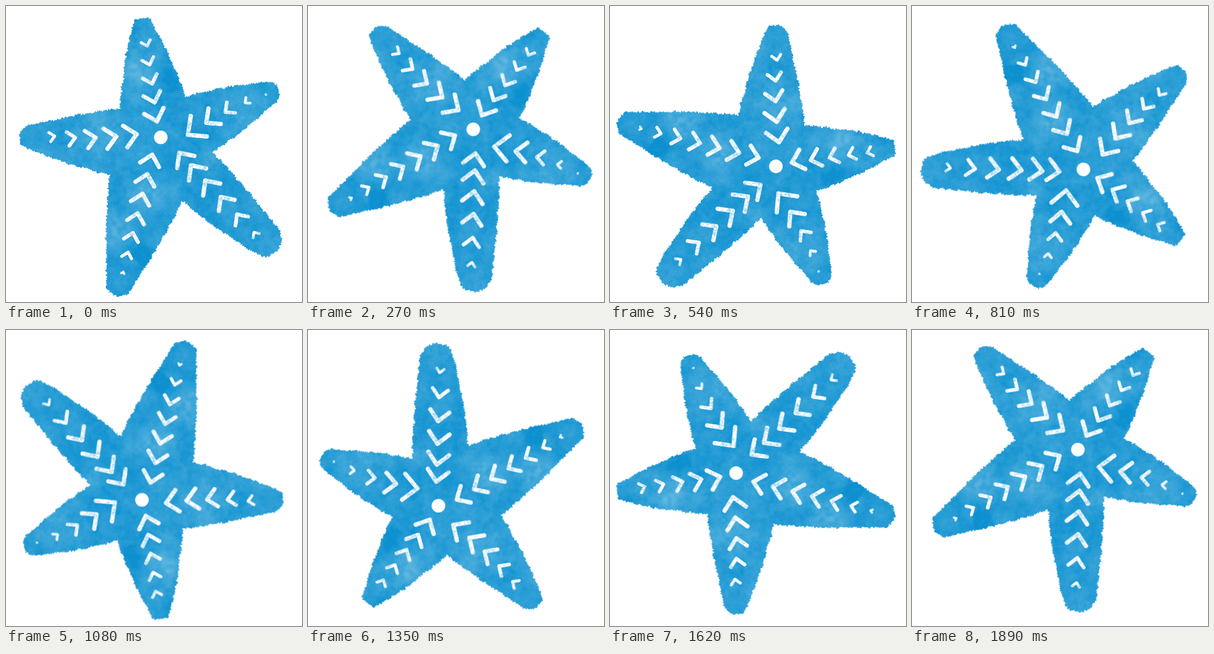
Write an HTML page with a canvas that moves like this. It is 480x480 px and loops after 2.16 s.

```html
<!DOCTYPE html>
<html lang="en">
<head>
<meta charset="utf-8">
<title>Starfish</title>
<style>
html, body { margin: 0; width: 100%; height: 100%; overflow: hidden; background: #fff; }
canvas { display: block; width: 480px; height: 480px; }
</style>
</head>
<body>
<canvas id="stage" width="480" height="480"></canvas>
<script>
const SIZE = 480, STEP = 270;
const HUB = { x: 251, y: 213 };

// eighths of a turn, then the place of the hub
const POSES = [
  [0, 251, 213], [1, 268, 200], [2, 269, 260], [3, 278, 265],
  [4, 220.5, 275.5], [5, 211.5, 285], [6, 204.5, 232], [1, 269, 194]
];

// tip: centre and radius of the rounded end; notch: the corner after the arm, clockwise.
// Marks run between two points and shrink from near to far.
const ARMS = [
  { tip: [222, 38, 19], notch: [292, 147],
    from: [245, 187], to: [229, 65], count: 5, near: 24, far: 11, fade: 1, tilt: -10 },
  { tip: [424, 142, 20], notch: [335, 237],
    from: [295, 209], to: [421, 144], count: 5, near: 31, far: 1, fade: 1, tilt: -11, bend: -5 },
  { tip: [419, 378, 28], notch: [286, 317],
    from: [281, 238], to: [402, 367], count: 6, near: 25, far: 9, fade: 4, tilt: 8, ease: 1.15 },
  { tip: [184, 449, 22], notch: [168, 274],
    from: [237, 241], to: [190, 431], count: 7, near: 23, far: 4, fade: 3, tilt: 0 },
  { tip: [43, 213, 21], notch: [184, 167],
    from: [212, 208], to: [79, 211], count: 5, near: 26, far: 11, fade: 1.6, tilt: -10, bend: -4 }
];

// x, y, radius, lightness
const WASHES = [
  [212, 110, 26, .42], [172, 360, 28, .35], [227, 305, 32, .25], [135, 215, 48, .18],
  [345, 170, 36, .15], [262, 118, 24, -.2], [220, 408, 26, -.28], [300, 200, 48, -.12]
];

const hash = (x, y) => {
  let h = Math.imul(x, 374761393) + Math.imul(y, 668265263) | 0;
  h = Math.imul(h ^ h >>> 13, 1274126177);
  return ((h ^ h >>> 16) >>> 0) / 4294967296;
};
const mix = (a, b, t) => a + (b - a) * t;
const clamp = (v, lo, hi) => Math.min(hi, Math.max(lo, v));

function noise(x, y) {
  const i = Math.floor(x), j = Math.floor(y);
  let u = x - i, v = y - j;
  u *= u * (3 - 2 * u);
  v *= v * (3 - 2 * v);
  return mix(mix(hash(i, j), hash(i + 1, j), u), mix(hash(i, j + 1), hash(i + 1, j + 1), u), v);
}

function cloud(x, y) {
  return .36 * noise(x / 30, y / 30) + .26 * noise(x / 13 + 9, y / 13)
    + .22 * noise(x / 6, y / 6 + 5) + .16 * noise(x / 2.5, y / 2.5);
}

// Draws shapes on their own layer, then recolours each painted pixel.
function layer(draw, shade) {
  const c = document.createElement('canvas');
  c.width = c.height = SIZE;
  const g = c.getContext('2d');
  draw(g);
  const img = g.getImageData(0, 0, SIZE, SIZE), d = img.data;
  for (let i = 0; i < d.length; i += 4) {
    if (d[i + 3]) shade(d, i, i / 4 % SIZE, Math.floor(i / 4 / SIZE));
  }
  g.putImageData(img, 0, 0);
  return c;
}

// A line with frayed edges and a slight outward bulge.
function frayed(g, [ax, ay], [bx, by], bulge) {
  const dx = bx - ax, dy = by - ay, len = Math.hypot(dx, dy);
  for (let s = 0; s < len; s += 1.2) {
    const t = s / len, x = mix(ax, bx, t), y = mix(ay, by, t);
    const seed = Math.round(x * 31 + y * 17);
    const off = bulge * 4 * t * (1 - t) + (hash(seed, 7) - .5) * 3.4
      + (noise(x / 6, y / 6) - .5) * 3;
    g.lineTo(x + dy / len * off, y - dx / len * off);
  }
}

function body(g) {
  g.beginPath();
  ARMS.forEach(({ tip: [x, y, r], notch }, k) => {
    const prev = ARMS[(k + ARMS.length - 1) % ARMS.length].notch;
    const aim = Math.atan2(y - (prev[1] + notch[1]) / 2, x - (prev[0] + notch[0]) / 2);
    const rim = a => [x + r * Math.cos(aim + a), y + r * Math.sin(aim + a)];
    const turn = Math.PI / 12;
    frayed(g, prev, rim(-6 * turn), 2.5);
    for (let i = -6; i < 6; i++) frayed(g, rim(i * turn), rim((i + 1) * turn), 0);
    frayed(g, rim(6 * turn), notch, 2.5);
  });
  g.closePath();
  g.fill();
}

function paint(d, i, x, y) {
  let v = .25 + (cloud(x, y) - .5) * .7;
  for (const [px, py, r, k] of WASHES) {
    const q = ((x - px) ** 2 + (y - py) ** 2) / (r * r);
    v += k * Math.exp(-q) * (.4 + 1.1 * noise(x / 8, y / 8));
  }
  v = clamp(v, 0, .85);
  d[i] = mix(12, 125, v);
  d[i + 1] = mix(144, 196, v);
  d[i + 2] = mix(208, 229, v);
}

function chalk(g) {
  g.strokeStyle = g.fillStyle = '#fff';
  g.lineCap = g.lineJoin = 'round';
  for (const { from, to, count, near, far, fade, tilt, bend = 0, ease = 1 } of ARMS) {
    const aim = Math.atan2(to[1] - from[1], to[0] - from[0]);
    for (let k = 0; k < count; k++) {
      const t = k / (count - 1), along = t ** ease, side = bend * 4 * t * (1 - t);
      const x = mix(from[0], to[0], along) - Math.sin(aim) * side;
      const y = mix(from[1], to[1], along) + Math.cos(aim) * side;
      const leg = mix(near, far, t ** fade), mid = aim + tilt * Math.PI / 180;
      g.lineWidth = Math.min(3 + leg * .17, 7);
      g.beginPath();
      g.moveTo(x + leg * Math.cos(mid - .75), y + leg * Math.sin(mid - .75));
      g.lineTo(x, y);
      g.lineTo(x + leg * Math.cos(mid + .75), y + leg * Math.sin(mid + .75));
      g.stroke();
    }
  }
  g.beginPath();
  g.arc(HUB.x, HUB.y, 11, 0, 7);
  g.fill();
}

function grain(d, i, x, y) {
  if (Math.hypot(x - HUB.x, y - HUB.y) < 14) return;
  const worn = noise(x / 2, y / 2) * .6 + noise(x / 8, y / 8) * .4;
  d[i + 3] *= clamp(1.35 - worn * .9, .45, 1);
}

const fish = layer(body, paint);
fish.getContext('2d').drawImage(layer(chalk, grain), 0, 0);

const ctx = document.getElementById('stage').getContext('2d');
const start = performance.now();

function frame() {
  const time = Math.max(0, performance.now() - start);
  const [turn, x, y] = POSES[Math.floor(time / STEP) % POSES.length];
  ctx.setTransform(1, 0, 0, 1, 0, 0);
  ctx.fillStyle = '#fff';
  ctx.fillRect(0, 0, SIZE, SIZE);
  ctx.translate(x, y);
  ctx.rotate(turn * Math.PI / 4);
  ctx.drawImage(fish, -HUB.x, -HUB.y);
  requestAnimationFrame(frame);
}
frame();
</script>
</body>
</html>
```
